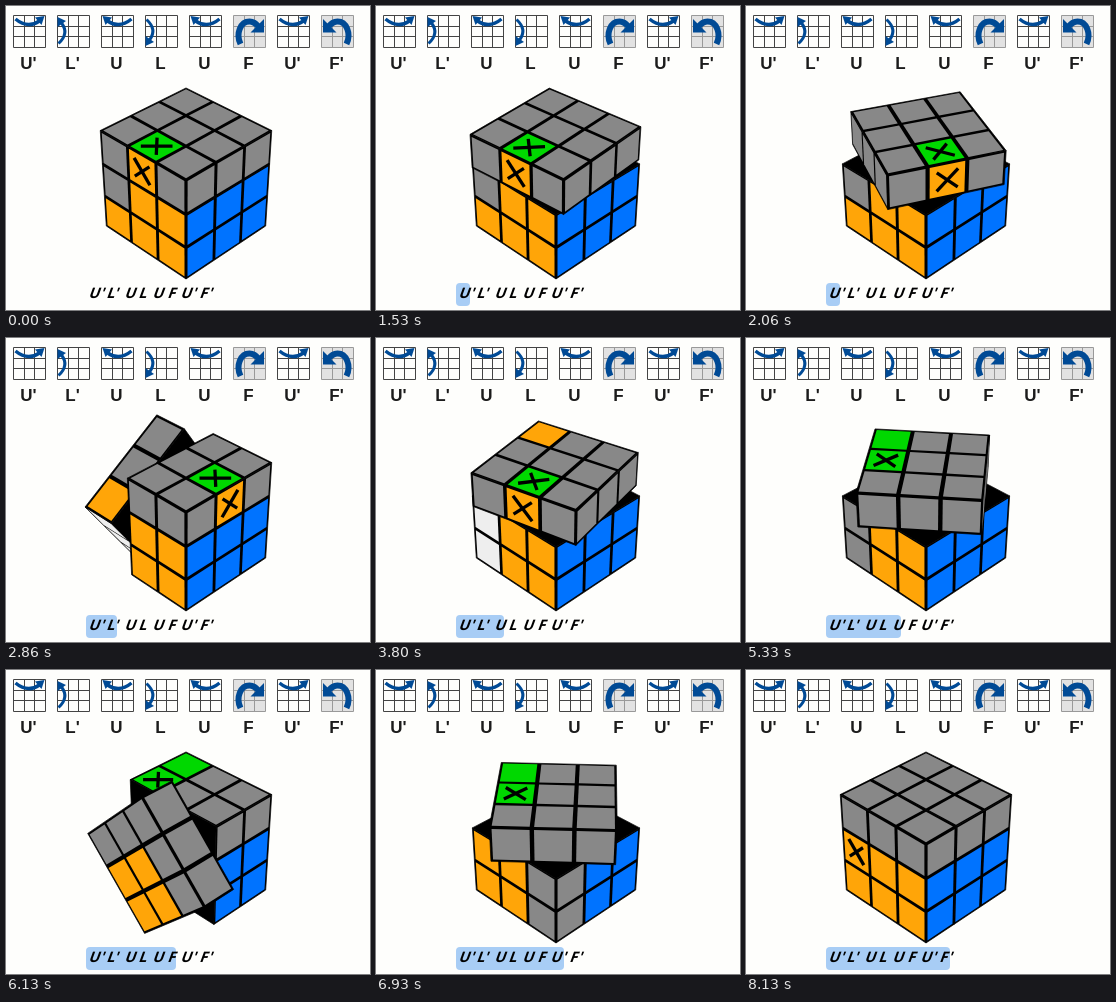
These frames come from a looping animation (364x304 px, 10 s). An HTML page with a canvas:

```html
<!DOCTYPE html>
<html lang="en">
<head>
<meta charset="utf-8">
<title>Cube moves</title>
<style>
  html, body { margin: 0; width: 100%; height: 100%; overflow: hidden; background: #fefefc; }
  svg, canvas { position: absolute; left: 0; top: 0; width: 364px; height: 304px; }
  .label { font: bold 17px "Liberation Sans", Arial, sans-serif; text-anchor: middle; fill: #1c1c1c; }
  .step { font: bold 14.5px "Open Sans", "Noto Sans", sans-serif; letter-spacing: 0.5px; fill: #000; }
</style>
</head>
<body>
<svg id="panel" viewBox="0 0 364 304">
  <rect id="mark" x="80" y="277" width="0" height="23" rx="4" fill="#a8cdf5"/>
</svg>
<canvas id="cube"></canvas>
<script>
const LOOP = 10000, START = 1530, STEP = 1000 / 15, LAST = 99, TURN = 12;

// name, step at which the turn starts, text x, right end of the highlight
const MOVES = [
  ["U'", -0.64, 82, 94], ["L'", 12.4, 100, 111], ["U", 23.7, 118, 128], ["L", 37, 132, 141],
  ["U", 50.2, 146, 155], ["F", 62.9, 161, 170], ["U'", 75.35, 174, 188], ["F'", 87, 193, 204]
].map(([name, start, x, end]) => ({ name, start, x, end }));

// A clockwise turn carries axis a to axis b
const LAYERS = {
  U: { axis: 1, side: 1, a: 0, b: 2 },
  L: { axis: 0, side: -1, a: 1, b: 2 },
  F: { axis: 2, side: 1, a: 1, b: 0 }
};

const GRAY = "#888", ORANGE = "#ffa508", BLUE = "#0073ff", GREEN = "#00d800",
      WHITE = "#eeeeee", RED = "#e00000", ARROW = "#004a95";

/* ---- move icons and text ---- */

const ARROWS = {
  U: '<path d="M30 3.5Q18 13.5 6 5.5" fill="none" stroke-width="3.4"/><path d="M1 0.5L10.5 2L4 9.5Z" stroke="none"/>',
  L: '<path d="M1 4Q12 14 4 24.5" fill="none" stroke-width="3"/><path d="M0 30.5L0 20.5L8.5 26.5Z" stroke="none"/>',
  F: '<path d="M7 28.5C2 18 7 6 16 6C20 6 22 8 25 11" fill="none" stroke-width="6"/><path d="M30.5 3.5V17H17Z" stroke="none"/>'
};
const FLIPS = { U: "translate(32 0) scale(-1 1)", L: "translate(0 32) scale(1 -1)", F: "translate(32 0) scale(-1 1)" };

function icon(name, i) {
  const face = name[0], flip = name.length > 1 ? FLIPS[face] : "";
  const [fill, line] = face === "F" ? ["#e2e2e2", "#999"] : ["none", "#444"];
  return `<g transform="translate(${7.5 + 44 * i} 9.5)">
    <path d="M0 0H32V32H0ZM11 0V32M21 0V32M0 11H32M0 21H32" fill="${fill}" stroke="${line}"/>
    <g transform="${flip}" fill="${ARROW}" stroke="${ARROW}">${ARROWS[face]}</g>
    <text class="label" x="15" y="53.5">${name}</text></g>`;
}

const panel = document.getElementById("panel");
panel.insertAdjacentHTML("beforeend", MOVES.map((m, i) => icon(m.name, i) +
  `<text class="step" transform="translate(${m.x} 292) skewX(-20)">${m.name}</text>`).join(""));
const mark = document.getElementById("mark");

/* ---- cube state ---- */

function paint([x, y, z], axis, sign) {
  if (axis === 1) {
    if (sign < 0) return WHITE;
    return x === 0 && z === 1 ? GREEN : GRAY;
  }
  if (axis === 2 && sign > 0 && x === 0 && y === 1) return ORANGE;
  if (y === 1 || (x === -1 && y === 0 && z === 1)) return GRAY;
  if (axis === 0) return sign > 0 ? BLUE : GREEN;
  return sign > 0 ? ORANGE : RED;
}

function firstStickers() {
  const list = [], range = [-1, 0, 1];
  for (let axis = 0; axis < 3; axis++)
    for (const sign of [-1, 1])
      for (const i of range)
        for (const j of range) {
          const pos = [0, 0, 0], normal = [0, 0, 0];
          pos[axis] = normal[axis] = sign;
          pos[(axis + 1) % 3] = i;
          pos[(axis + 2) % 3] = j;
          const cross = pos[0] === 0 && pos[1] === 1 && pos[2] === 1;
          list.push({ pos, normal, cross, color: paint(pos, axis, sign) });
        }
  return list;
}

function rotate(v, layer, angle) {
  const c = Math.cos(angle), s = Math.sin(angle), r = v.slice();
  r[layer.a] = v[layer.a] * c - v[layer.b] * s;
  r[layer.b] = v[layer.a] * s + v[layer.b] * c;
  return r;
}

const quarter = move => (move.name.length > 1 ? -1 : 1) * Math.PI / 2;
const inLayer = (sticker, layer) => sticker.pos[layer.axis] === layer.side;

function turn(stickers, move) {
  const layer = LAYERS[move.name[0]];
  const spin = v => rotate(v, layer, quarter(move)).map(Math.round);
  return stickers.map(s => inLayer(s, layer) ? { ...s, pos: spin(s.pos), normal: spin(s.normal) } : s);
}

const states = [firstStickers()];
MOVES.forEach((m, i) => states.push(turn(states[i], m)));

/* ---- drawing ---- */

const canvas = document.getElementById("cube"), ctx = canvas.getContext("2d");
const ratio = window.devicePixelRatio || 1;
canvas.width = 364 * ratio;
canvas.height = 304 * ratio;
ctx.scale(ratio, ratio);
ctx.lineJoin = "round";

const EYE = 15.8, ZOOM = 923;
const R2 = Math.SQRT1_2, COS = Math.sqrt(2 / 3), SIN = Math.sqrt(1 / 3);

function project([x, y, z]) {
  const h = (x + z) * R2, k = ZOOM / (EYE - h * COS - y * SIN);
  return [180 + (x - z) * R2 * k, 174 - (y * COS - h * SIN) * k];
}

function trace(points) {
  ctx.beginPath();
  points.forEach((p, i) => ctx[i ? "lineTo" : "moveTo"](...project(p)));
}

const CORNERS = [[-1, -1], [1, -1], [1, 1], [-1, 1]];

function drawSticker(sticker, axis, spin) {
  const center = sticker.pos.map(v => v * 2 / 3);
  center[axis] = sticker.normal[axis];
  const square = size => CORNERS.map(([i, j]) => {
    const p = center.slice();
    p[(axis + 1) % 3] += i * size / 3;
    p[(axis + 2) % 3] += j * size / 3;
    return spin(p);
  });
  trace(square(0.895));
  ctx.fillStyle = sticker.color;
  ctx.fill();
  if (!sticker.cross) return;
  const [a, b, c, d] = square(0.54);
  ctx.lineWidth = 3.3;
  for (const line of [[a, c], [b, d]]) {
    trace(line);
    ctx.stroke();
  }
}

function drawBlock(stickers, low, high, spin) {
  for (let axis = 0; axis < 3; axis++)
    for (const sign of [-1, 1]) {
      const normal = [0, 0, 0];
      normal[axis] = sign;
      const face = CORNERS.map(([i, j]) => {
        const p = [0, 0, 0], u = (axis + 1) % 3, v = (axis + 2) % 3;
        p[axis] = (sign < 0 ? low : high)[axis];
        p[u] = (i < 0 ? low : high)[u];
        p[v] = (j < 0 ? low : high)[v];
        return spin(p);
      });
      const facing = spin(normal).reduce((sum, n, i) => sum + n * (EYE * SIN - face[0][i]), 0);
      if (facing <= 0) continue;
      trace(face);
      ctx.closePath();
      ctx.fillStyle = ctx.strokeStyle = "#000";
      ctx.lineWidth = 0.7;
      ctx.fill();
      ctx.stroke();
      stickers.filter(s => s.normal[axis] === sign).forEach(s => drawSticker(s, axis, spin));
    }
}

function drawCube(index, progress) {
  const move = MOVES[index], layer = LAYERS[move.name[0]], stickers = states[index];
  const { axis, side } = layer, angle = quarter(move) * progress;
  const block = (moving, spin) => {
    const low = [-1, -1, -1], high = [1, 1, 1];
    (moving === side > 0 ? low : high)[axis] = side / 3;
    drawBlock(stickers.filter(s => inLayer(s, layer) === moving), low, high, spin);
  };
  const parts = [() => block(false, v => v), () => block(true, v => rotate(v, layer, angle))];
  if (side < 0) parts.reverse();
  ctx.clearRect(0, 0, 364, 304);
  parts.forEach(draw => draw());
}

/* ---- timeline ---- */

let shown = null;

function render(time) {
  const t = time % LOOP;
  const step = t < START ? -1 : Math.min(LAST, Math.floor((t - START + 7) / STEP));
  if (step === shown) return;
  shown = step;
  if (step < 0) {
    mark.setAttribute("width", 0);
    drawCube(0, 0);
    return;
  }
  const index = MOVES.filter(m => m.start <= step).length - 1;
  mark.setAttribute("width", MOVES[index].end - 80);
  drawCube(index, Math.min(1, (step - MOVES[index].start) / TURN));
}

const origin = performance.now();
function tick() {
  render(performance.now() - origin);
  requestAnimationFrame(tick);
}
tick();
</script>
</body>
</html>
```
